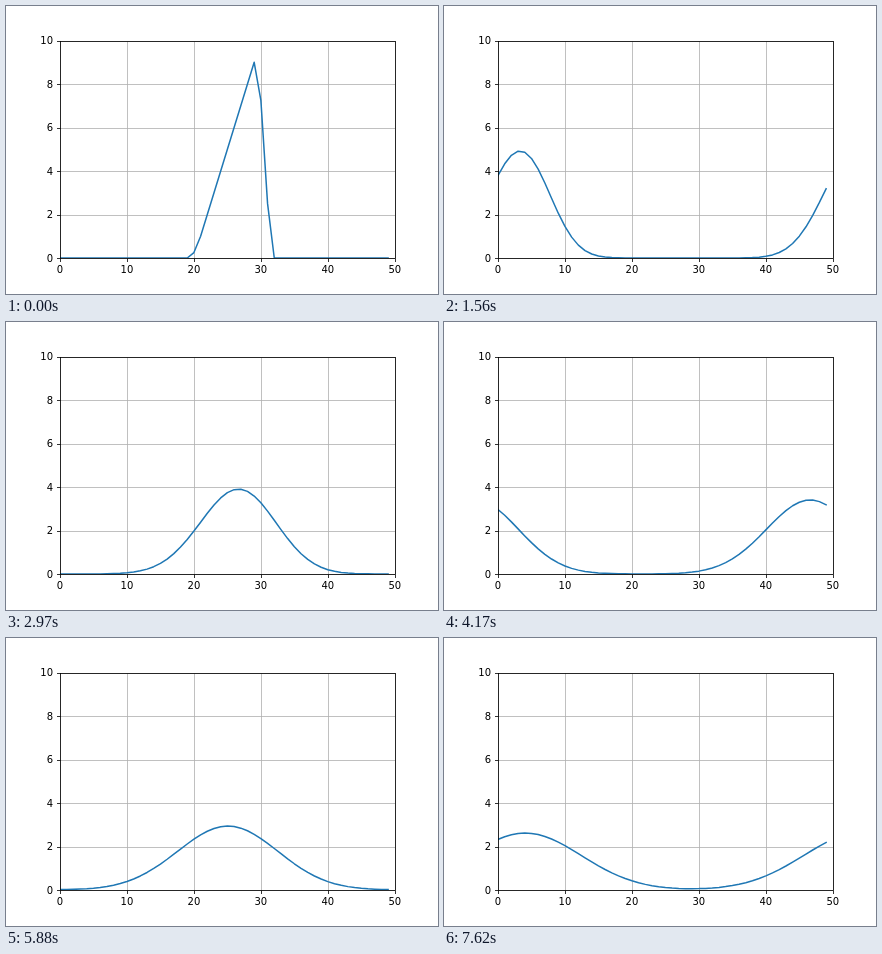
An HTML page that plays this animation: 432 by 288 pixels, repeating every 7.65 s.

```html
<!DOCTYPE html>
<html lang="en">
<head>
<meta charset="utf-8">
<title>Upwind advection</title>
<style>
  html, body { margin: 0; width: 100%; height: 100%; overflow: hidden; background: #fff; }
  svg { display: block; width: 432px; height: 288px; }
  text { font: 10px "DejaVu Sans", sans-serif; fill: #000; }
  .grid { stroke: #b0b0b0; stroke-width: .8; }
  .axis { stroke: #000; stroke-width: .8; fill: none; }
  .wave { stroke: #1f77b4; stroke-width: 1.5; fill: none; stroke-linejoin: round; stroke-linecap: square; }
</style>
</head>
<body>
<svg id="plot" viewBox="0 0 432 288">
  <clipPath id="area"><rect x="54" y="35" width="335" height="217"/></clipPath>
</svg>
<script>
const CELLS = 50, COURANT = 0.5, FRAMES = 255, STEP_MS = 30;
const LEFT = 54, RIGHT = 388.8, TOP = 34.56, BOTTOM = 252;

const plot = document.getElementById('plot');
const px = x => LEFT + (RIGHT - LEFT) * x / 50;
const py = y => BOTTOM - (BOTTOM - TOP) * y / 10;
const snap = v => Math.floor(v + 0.5) + 0.5;

function add(tag, attrs, text) {
  const el = document.createElementNS('http://www.w3.org/2000/svg', tag);
  for (const key in attrs) el.setAttribute(key, attrs[key]);
  if (text !== undefined) el.textContent = text;
  return plot.appendChild(el);
}
const line = (cls, x1, y1, x2, y2) => add('line', { class: cls, x1, y1, x2, y2 });

const xTicks = [0, 10, 20, 30, 40, 50];
const yTicks = [0, 2, 4, 6, 8, 10];

for (const v of xTicks) line('grid', snap(px(v)), 35, snap(px(v)), 252);
for (const v of yTicks) line('grid', 54, snap(py(v)), 389, snap(py(v)));

const wave = add('path', { class: 'wave', 'clip-path': 'url(#area)' });

add('rect', { class: 'axis', x: 54.5, y: 35.5, width: 335, height: 217 });
for (const v of xTicks) {
  const x = snap(px(v));
  line('axis', x, 252.5, x, 256);
  add('text', { x: px(v), y: 267, 'text-anchor': 'middle' }, v);
}
for (const v of yTicks) {
  const y = snap(py(v));
  line('axis', 51, y, 54.5, y);
  add('text', { x: 47, y: Math.round(py(v) + 3.8), 'text-anchor': 'end' }, v);
}

// First-order upwind step on a periodic grid
const advect = u => u.map((v, i) => v - COURANT * (v - u[(i + CELLS - 1) % CELLS]));

const ramp = Array.from({ length: CELLS }, (_, i) => i >= 20 && i < 30 ? i - 19 : 0);
const states = [advect(advect(ramp))];
while (states.length < FRAMES) states.push(advect(states[states.length - 1]));

const paths = states.map(u =>
  'M' + u.map((v, i) => px(i).toFixed(3) + ',' + py(v).toFixed(3)).join('L'));

let shown = -1;
function draw(now) {
  const n = Math.floor(Math.max(0, now - start) / STEP_MS) % FRAMES;
  if (n !== shown) wave.setAttribute('d', paths[shown = n]);
  requestAnimationFrame(draw);
}
const start = performance.now();
draw(start);
</script>
</body>
</html>
```
